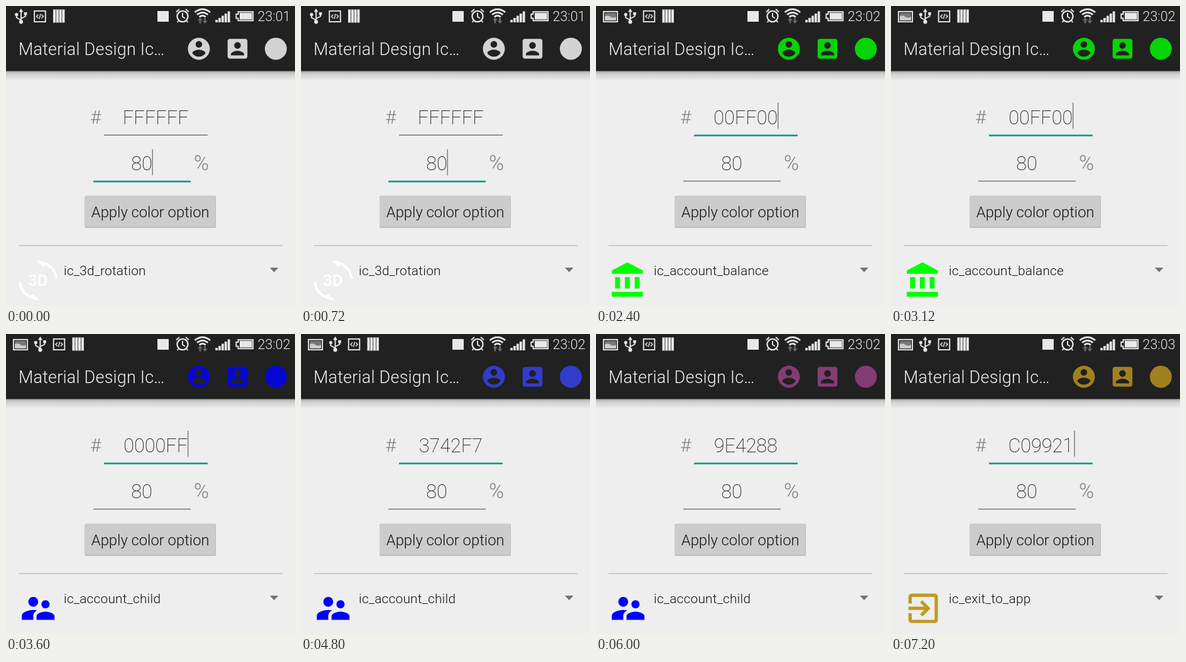
An HTML page for the animation above (8.4 s loop, 460 by 477 pixels).

```html
<!DOCTYPE html>
<html lang="en">
<head>
<meta charset="utf-8">
<title>Icon color options</title>
<style>
  html, body { margin: 0; width: 100%; height: 100%; overflow: hidden; background: #eee; }
  svg { display: block; width: 460px; height: 477px; }
  text { font-family: Roboto, "Liberation Sans", sans-serif; font-weight: 300; fill: #111; }
  .mid { text-anchor: middle; }
  .value { font-size: 30.6px; font-weight: 200; fill: #000; }
  .sign { font-size: 30px; fill: #808080; }
  .item { font-size: 20.8px; letter-spacing: .25px; }
  .line { fill: none; stroke: #e8e8e8; stroke-width: 1.9; }
  .solid { fill: #e8e8e8; }
  .cursor { fill: #777; }
</style>
</head>
<body>
<svg viewBox="0 0 460 477">
  <defs>
    <linearGradient id="shade" x2="0" y2="1">
      <stop offset="0" stop-color="#a4a4a4"/>
      <stop offset=".3" stop-color="#cdcdcd"/>
      <stop offset="1" stop-color="#eee"/>
    </linearGradient>
  </defs>

  <rect width="460" height="477" fill="#eee"/>
  <rect y="103" width="460" height="16" fill="url(#shade)"/>
  <rect width="460" height="103.5" fill="#212121"/>

  <!-- status bar, left -->
  <g id="picture">
    <rect class="line" x="11.9" y="8.9" width="22.2" height="16.2"/>
    <rect x="14" y="11" width="18" height="12" fill="#777"/>
    <path d="M14 16q5-2 9 1t9 0v6H14z" fill="#ccc"/>
  </g>
  <g id="notices">
    <path class="line" d="M24 9V25M24 22.5L16.8 18.5V14.5M24 20L31 16.5V13.5"/>
    <path class="solid" d="M24 4l3.4 5.5h-6.8zM28.7 10h4.6v4.6h-4.6z"/>
    <circle class="solid" cx="16.8" cy="13.5" r="2.6"/>
    <circle class="solid" cx="24" cy="25.2" r="3.1"/>
    <rect class="line" x="45.2" y="7.9" width="17.6" height="17.2"/>
    <path class="line" style="stroke-width:1.4" d="M51.4 13.5l-2.9 3 2.9 3M56.6 13.5l2.9 3-2.9 3M55 12.5l-2 8"/>
    <path class="solid" d="M75 5.5h4v21h-4zM79.8 5.5h4v21h-4zM84.6 5.5h4v21h-4zM89.4 5.5h4v21h-4z"/>
  </g>

  <!-- status bar, right -->
  <rect class="solid" x="241" y="8" width="18" height="17"/>
  <g class="line">
    <circle cx="281" cy="16.5" r="8.6" stroke-width="2.3"/>
    <path d="M281 11v6l4 2.5M271 9.5l5-4.5M291 9.5L286 5M275 23l-2.5 3M287 23l2.5 3"/>
    <path stroke-width="2.7" d="M300.5 10q12.3-9.8 24.6 0M304.1 13.8q8.7-7 17.4 0M307.7 17.4q5.1-4.2 10.2 0"/>
  </g>
  <path id="traffic" d="M309 18.5l4 4.5h-2.7v4.5h-2.6V23H305zM316.7 28l-4-4.5h2.7V19h2.6v4.5h2.7z"/>
  <path class="solid" d="M333.2 22h3.8v4h-3.8zM338.1 19h3.8v7h-3.8zM343 15.5h3.8V26H343zM347.9 12h3.8v14h-3.8zM352.8 8.5h3.8V26h-3.8z"/>
  <path class="line" d="M369.5 9.2H393.2V23.2H369.5V19.5H366.3V13h3.2z"/>
  <rect class="solid" x="372" y="11" width="19.6" height="10.4"/>
  <text id="clock" x="400.5" y="24" font-size="21.5" style="fill:#e8e8e8"></text>

  <!-- app bar -->
  <text x="20" y="78" font-size="26.9" letter-spacing=".25" style="fill:#f4f4f4">Material Design Ic…</text>
  <g id="actions" fill-opacity=".8">
    <path transform="translate(286 47) scale(1.75)" d="M12 2C6.48 2 2 6.48 2 12s4.48 10 10 10 10-4.48 10-10S17.52 2 12 2zm0 3c1.66 0 3 1.34 3 3s-1.34 3-3 3-3-1.34-3-3 1.34-3 3-3zm0 14.2c-2.5 0-4.71-1.28-6-3.22.03-1.99 4-3.08 6-3.08 1.99 0 5.97 1.09 6 3.08-1.29 1.94-3.5 3.22-6 3.22z"/>
    <path transform="translate(347.5 47) scale(1.75)" d="M3 5v14c0 1.1.89 2 2 2h14c1.1 0 2-.9 2-2V5c0-1.1-.9-2-2-2H5c-1.11 0-2 .9-2 2zm12 4c0 1.66-1.34 3-3 3s-3-1.34-3-3 1.34-3 3-3 3 1.34 3 3zm-9 8c0-2 4-3.1 6-3.1s6 1.1 6 3.1v1H6v-1z"/>
    <circle cx="429.5" cy="68" r="17.5"/>
  </g>

  <!-- form -->
  <text class="sign" x="134" y="186.5">#</text>
  <text class="value mid" id="hex" x="238.3" y="187.5"></text>
  <rect id="hexLine" x="156" width="165"/>
  <rect class="cursor" id="hexCursor" y="153.7" width="1.4" height="41.5"/>

  <text class="value mid" x="216" y="261">80</text>
  <text class="sign" x="299" y="261" style="font-size:32.5px">%</text>
  <rect id="alphaLine" x="139" width="155"/>
  <rect class="cursor" id="alphaCursor" x="232.5" y="227.7" width="1.4" height="41.5"/>

  <rect x="125.5" y="302" width="208.5" height="50.5" rx="1.5" fill="#a6a6a6"/>
  <rect x="126" y="301.5" width="207.5" height="50" rx="1.5" fill="#ccc"/>
  <text class="mid" x="229.7" y="336" font-size="23.8">Apply color option</text>

  <rect x="20" y="380.3" width="420" height="1.4" fill="#bdbdbd"/>
  <text class="item" id="label" x="92" y="427.5"></text>
  <path d="M420 416h13.6l-6.8 7.2z" fill="#737373"/>

  <g id="icons" transform="translate(20 405) scale(2.6)">
    <g id="ic_3d_rotation">
      <path d="M7.52 21.48C4.25 19.94 1.91 16.76 1.55 13H.05C.56 19.16 5.71 24 12 24l.66-.03-3.81-3.81zM12 0l-.66.03 3.81 3.81 1.33-1.33c3.27 1.55 5.61 4.72 5.96 8.48h1.5C23.44 4.84 18.29 0 12 0z"/>
      <text class="mid" x="11.9" y="15.4" font-size="9.9" style="fill:inherit;font-weight:500">3D</text>
    </g>
    <path id="ic_account_balance" d="M4 10v7h3v-7H4zm6 0v7h3v-7h-3zM2 22h19v-3H2v3zm14-12v7h3v-7h-3zm-4.5-9L2 6v2h19V6l-9.5-5z"/>
    <path id="ic_account_child" d="M16.5 12c1.38 0 2.49-1.12 2.49-2.5S17.88 7 16.5 7C15.12 7 14 8.12 14 9.5s1.12 2.5 2.5 2.5zM9 11c1.66 0 2.99-1.34 2.99-3S10.66 5 9 5C7.34 5 6 6.34 6 8s1.34 3 3 3zm7.5 3c-1.83 0-5.5.92-5.5 2.75V19h11v-2.25c0-1.83-3.67-2.75-5.5-2.75zM9 13c-2.33 0-7 1.17-7 3.5V19h7v-2.25c0-.85.33-2.34 2.37-3.47C10.5 13.1 9.66 13 9 13z"/>
    <path id="ic_exit_to_app" d="M10.09 15.59L11.5 17l5-5-5-5-1.41 1.41L12.67 11H3v2h9.67l-2.58 2.59zM19 3H5c-1.11 0-2 .9-2 2v4h2V5h14v14H5v-4H3v4c0 1.1.89 2 2 2h14c1.1 0 2-.9 2-2V5c0-1.1-.9-2-2-2z"/>
  </g>
</svg>
<script>
  const STEP = 1200;
  const ICONS = {
    ic_3d_rotation: '#fff',
    ic_account_balance: '#0f0',
    ic_account_child: '#00f',
    ic_exit_to_app: '#c09921'
  };
  // hex value, clock, list item, cursor x (0 = blinked off)
  const STATES = [
    ['FFFFFF', '23:01', 'ic_3d_rotation', 0],
    ['FF0000', '23:01', 'ic_3d_rotation', 289],
    ['00FF00', '23:02', 'ic_account_balance', 289],
    ['0000FF', '23:02', 'ic_account_child', 289],
    ['3742F7', '23:02', 'ic_account_child', 0],
    ['9E4288', '23:02', 'ic_account_child', 0],
    ['C09921', '23:03', 'ic_exit_to_app', 291.5]
  ];
  const $ = id => document.getElementById(id);
  const set = (id, attrs) => {
    for (const key in attrs) $(id).setAttribute(key, attrs[key]);
  };
  const show = (id, on) => set(id, { visibility: on ? 'visible' : 'hidden' });
  const underline = (id, y, focused) => set(id, focused
    ? { y, height: 2.7, fill: '#119688' }
    : { y, height: 1.5, fill: '#777' });

  let current = -1;

  function draw(index) {
    const [hex, clock, item, cursor] = STATES[index];
    const first = index === 0;
    $('hex').textContent = hex;
    $('clock').textContent = clock;
    $('label').textContent = item;
    set('actions', { fill: '#' + hex });
    set('icons', { fill: ICONS[item] });
    for (const id in ICONS) show(id, id === item);
    show('picture', !first);
    set('notices', { transform: `translate(${first ? 0 : 30.5})` });
    set('traffic', { fill: index === 1 ? '#e8e8e8' : '#6a6a6a' });
    underline('hexLine', 204.5, !first);
    underline('alphaLine', 277.7, first);
    show('hexCursor', cursor);
    set('hexCursor', { x: cursor });
    show('alphaCursor', first);
  }

  function tick() {
    const index = Math.floor(performance.now() / STEP) % STATES.length;
    if (index !== current) draw(current = index);
    requestAnimationFrame(tick);
  }
  tick();
</script>
</body>
</html>
```
